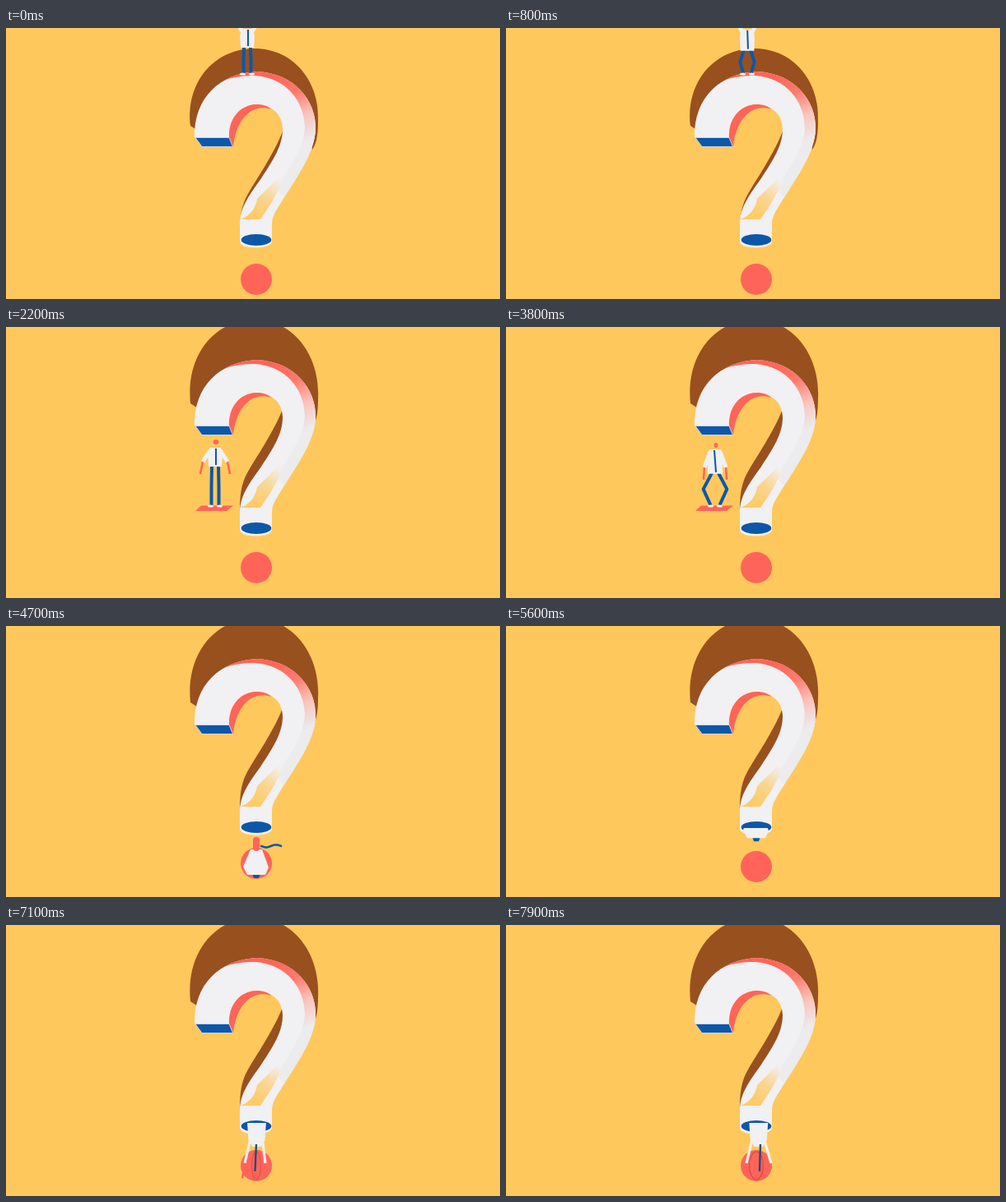
Recreate the animation shown at these times as an HTML page with a canvas. Size 600 by 330 pixels, loop 8 s.

```html
<!DOCTYPE html>
<html lang="en">
<head>
<meta charset="utf-8">
<title>Question mark</title>
<style>
html, body { margin: 0; width: 600px; height: 330px; overflow: hidden; background: #ffc85c; }
canvas { display: block; }
</style>
</head>
<body>
<canvas id="stage" width="600" height="330"></canvas>
<script>
const c = document.getElementById('stage').getContext('2d');
const LOOP = 8000;
const BG = '#ffc85c', WHITE = '#f1f0f2', CORAL = '#ff6459', BROWN = '#98501f', BLUE = '#0d57a9';

const clamp = v => Math.max(0, Math.min(1, v));
const mix = (a, b, p) => a + (b - a) * p;
const span = (t, a, b) => clamp((t - a) / (b - a));
const ease = (t, a, b) => (1 - Math.cos(Math.PI * span(t, a, b))) / 2;
const bump = (t, mid, reach) => ease(t, mid - reach, mid) - ease(t, mid, mid + reach);

// Pose of the mark: how stretched it is, how far it and its brown side hang down
let stretch, width, drop, sink, dot;

function pose(t) {
  stretch = bump(t, 1400, 400) + .2 * bump(t, 6300, 400);
  width = 1 - .075 * stretch;
  drop = 13 * (1 - ease(t, 900, 1900));
  sink = 13 * (1 - ease(t, 1000, 2200));
  dot = {
    x: 304 - 11 * stretch,
    y: 293 + drop + 13.5 * stretch - 4 * bump(t, 4700, 250),
    r: 19 - stretch
  };
}

// Narrower, bowed and with a longer stem when stretched
const warp = (x, y) => [
  302 + (x - 302) * width + stretch * (2 - .062 * Math.abs(y - 90)),
  y + drop + Math.max(0, y - 120) * .168 * stretch
];
const lower = y => y + sink * (1 + .006 * Math.max(0, 93 - y));
const path = (d, shift = y => y) => new Path2D(d.replace(/(-?[\d.]+) (-?[\d.]+)/g,
  (_, x, y) => warp(+x, shift(+y)).join(' ')));

function fill(shape, style) {
  c.fillStyle = style;
  c.fill(shape);
}
function fade(x1, y1, x2, y2, ...stops) {
  const g = c.createLinearGradient(...warp(x1, y1), ...warp(x2, y2));
  stops.forEach((col, i) => g.addColorStop(i / (stops.length - 1), col));
  return g;
}
function trace(p) {
  c.beginPath();
  for (let i = 0; i < p.length; i += 2) c.lineTo(p[i], p[i + 1]);
}
function line(col, w, ...p) {
  c.strokeStyle = col;
  c.lineWidth = w;
  trace(p);
  c.stroke();
}
function poly(col, ...p) {
  c.fillStyle = col;
  trace(p);
  c.fill();
}
function oval(col, x, y, rx, ry = rx) {
  c.fillStyle = col;
  c.beginPath();
  c.ellipse(x, y, rx, ry, 0, 0, 7);
  c.fill();
}

function drawMark() {
  fill(path('M224 93 C218 34 254 -9 302 -9 C350 -9 382 36 379 88 C379 108 376 116 372 122 ' +
    'C366 75 340 60 303 60 C262 60 245 80 236 101 Z', lower), BROWN);
  fill(path('M337 97 C330 118 310 150 298 169 C289 184 284 194 284 224 L300 224 L342 130 Z', lower), BROWN);

  const body = path('M229 120 C228 72 260 42 305 40 C350 42 377 75 376 110 C375 140 352 170 335 198 ' +
    'C327 211 323 216 323 226 L323 247 C323 257 284 257 284 247 L284 226 C284 205 296 190 310 170 ' +
    'C325 147 336 130 336 110 C336 92 322 80 304 80 C284 81 270 97 271 121 Z');
  fill(body, WHITE);
  c.save();
  c.clip(body);
  fill(path('M252 58 C270 46 288 45 303 45 C340 48 362 75 363 108 C362 135 342 160 328 183 L345 200 L390 110 L370 40 L305 30 Z'),
    fade(325, 45, 366, 125, CORAL, '#ff7a6e', '#f9c3ba', '#ecebed'));
  fill(path('M285 220 C297 215 303 207 305 195 C315 185 330 172 338 158 C337 180 320 204 309 220 Z'),
    fade(298, 212, 331, 170, '#fecb66', '#fad692', WHITE));
  c.restore();

  fill(path('M271 121 C270 97 284 81 304 80 C312 80 318 82 322 86 C298 78 279 99 276 132 Z'), CORAL);
  const end = path('M230 120.5 L271 120.5 L275.5 131.5 L238 131.5 Z');
  fill(end, BLUE);
  c.strokeStyle = '#dfe4ec';
  c.lineWidth = .8;
  c.stroke(end);
  oval(BLUE, ...warp(304, 245), 18.3 * width, 7 + 2 * stretch);
}

// q: how deep he squats; arms: 1 hanging, -1 thrown up
function drawMan(x, foot, q, leg = 48, arms = 1) {
  const hip = foot - leg + 9 * q, neck = foot - leg - 23 + 2 * q;
  const elbow = neck + 3 + arms * (14 + 5 * q);
  for (const s of [-1, 1]) {
    line(BLUE, 4, x + s * 4, hip - 1, x + s * (4.5 + 10 * q), (hip + foot) / 2 - q, x + s * (4.5 + q), foot - 1);
    oval('#fbe9dc', x + s * 5.5, foot, 3.5, 1.5);
    const reach = x + s * (15 - 2 * q);
    line(CORAL, 2.5, reach, elbow, reach + s * (3 - 2 * q), elbow + arms * 15);
    line(WHITE, 5, x + s * 6, neck + 3, reach, elbow);
  }
  poly(WHITE, x - 7, neck, x + 7, neck, x + 9, neck + 9, x + 8 + q, hip, x - 8 - q, hip, x - 9, neck + 9);
  line(BLUE, 2, x + 1 - 2 * q, neck + 1, x + 1, hip - 2);
  oval(CORAL, x + 1, neck - 7 + 2 * q, 3.3 - q, 3);
}

// Blue smear of the man racing down the stem
function drawSlide(t) {
  const head = 385 * span(t, 1160, 1640);
  if (!head || head === 385) return;
  c.save();
  c.setLineDash([42, 14, 62, 999]);
  c.lineDashOffset = 118 - head;
  c.strokeStyle = BLUE;
  c.lineWidth = 1.3;
  c.stroke(path('M310 46 C345 50 371 70 367 86 C363 120 348 138 336 153 C325 167 314 174 306 182 C298 192 290 215 292 240'));
  c.restore();
}

function drawMat(t) {
  const size = ease(t, 1800, 1950) - ease(t, 4150, 4400);
  const x = 223 + 30 * ease(t, 1800, 2100);
  poly(CORAL, x - 16 * size, 217.5, x + 23 * size, 217.5, x + 15 * size, 224, x - 23 * size, 224);
}

// Crouching on the dot, dropping out of the stem and back into it
function drawRider(t) {
  const hidden = 62 * (1 - ease(t, 4530, 4700) + ease(t, 5420, 5700));
  c.save();
  c.beginPath();
  c.rect(250, 246, 110, 84);
  c.clip();
  c.translate(0, 3 * bump(t, 5050, 350) - hidden);
  poly(BLUE, 299, 301, 309, 301, 307, 307, 301, 307);
  poly(WHITE, 297, 272, 311, 272, 319, 294, 315, 303, 293, 303, 288, 293);
  c.fillStyle = CORAL;
  c.beginPath();
  c.roundRect(300, 257, 8, 17, 4);
  c.fill();
  const tie = [];
  for (let i = 0; i <= 26; i += 2) tie.push(309 + i, 268 + 1.6 * Math.sin(i / 4 + (t - 4700) / 90) * clamp(i / 6));
  line(BLUE, 2.6, ...tie);
  c.restore();
}

// Hanging head down, twisting the dot like a bulb
function drawHanger(t) {
  const sway = -Math.cos((t - 6300) / 1600 * 3 * Math.PI);
  const right = (sway + 1) / 2;
  const x = 304.5 + 2.3 * sway;
  c.save();
  c.globalAlpha = .35 + .5 * right;
  c.strokeStyle = '#cf443c';
  c.lineWidth = 1.1;
  for (const s of [-1, 1]) {
    c.beginPath();
    c.ellipse(dot.x, dot.y, 5.5 + 3 * sway, dot.r - 2, 0, -Math.PI / 2, Math.PI / 2, s < 0);
    c.stroke();
  }
  c.restore();

  c.save();
  c.beginPath();
  c.rect(270, 241, 70, 89);
  c.clip();
  c.translate(0, 2 * stretch - 64 * (1 - ease(t, 5750, 6000)));
  poly(WHITE, x - 11.5, 240, x + 11.5, 240, x + 10, 262, x + 5, 270, x - 5, 270, x - 10, 262);
  const hand = mix(288, 292, right);
  line(WHITE, 3.2, x - 8, 262, hand, 290);
  line(WHITE, 3.2, x + 7, 262, mix(308, 322, right), 290);
  line(CORAL, 2.5, hand, 290, hand - 3, mix(313, 304, right));
  line('#234f78', 2.4, mix(299, 309, right), 267, mix(297, 308, right), 300);
  c.restore();
}

function draw(t) {
  pose(t);
  const q = .3 * bump(t, 300, 300) + .8 * bump(t, 900, 200) + .4 * bump(t, 2000, 180) +
    .3 * bump(t, 2900, 300) + bump(t, 3820, 250);
  c.fillStyle = BG;
  c.fillRect(0, 0, 600, 330);
  c.lineJoin = 'round';

  drawMat(t);
  if (t >= 1660 && t < 4250) {
    const hop = Math.sin(Math.PI * span(t, 1660, 2000));
    const leap = span(t, 3950, 4200);
    drawMan(mix(292, 254, ease(t, 1660, 2000)) - 38 * hop, mix(218 - 14 * hop, 128, leap * leap), q);
  }
  drawMark();
  drawSlide(t);
  if (t < 1230) {
    const go = ease(t, 1000, 1230);
    c.globalAlpha = 1 - span(t, 1150, 1230);
    drawMan(...warp(293 + 60 * go, 43 + 22 * go * go), q, 32, -1);
    c.globalAlpha = 1;
  }
  oval(CORAL, dot.x, dot.y, dot.r);
  if (t > 4530 && t < 5750) drawRider(t);
  if (t >= 5750) drawHanger(t);
}

const start = performance.now();
function tick() {
  draw((performance.now() - start) % LOOP);
  requestAnimationFrame(tick);
}
tick();
</script>
</body>
</html>
```
